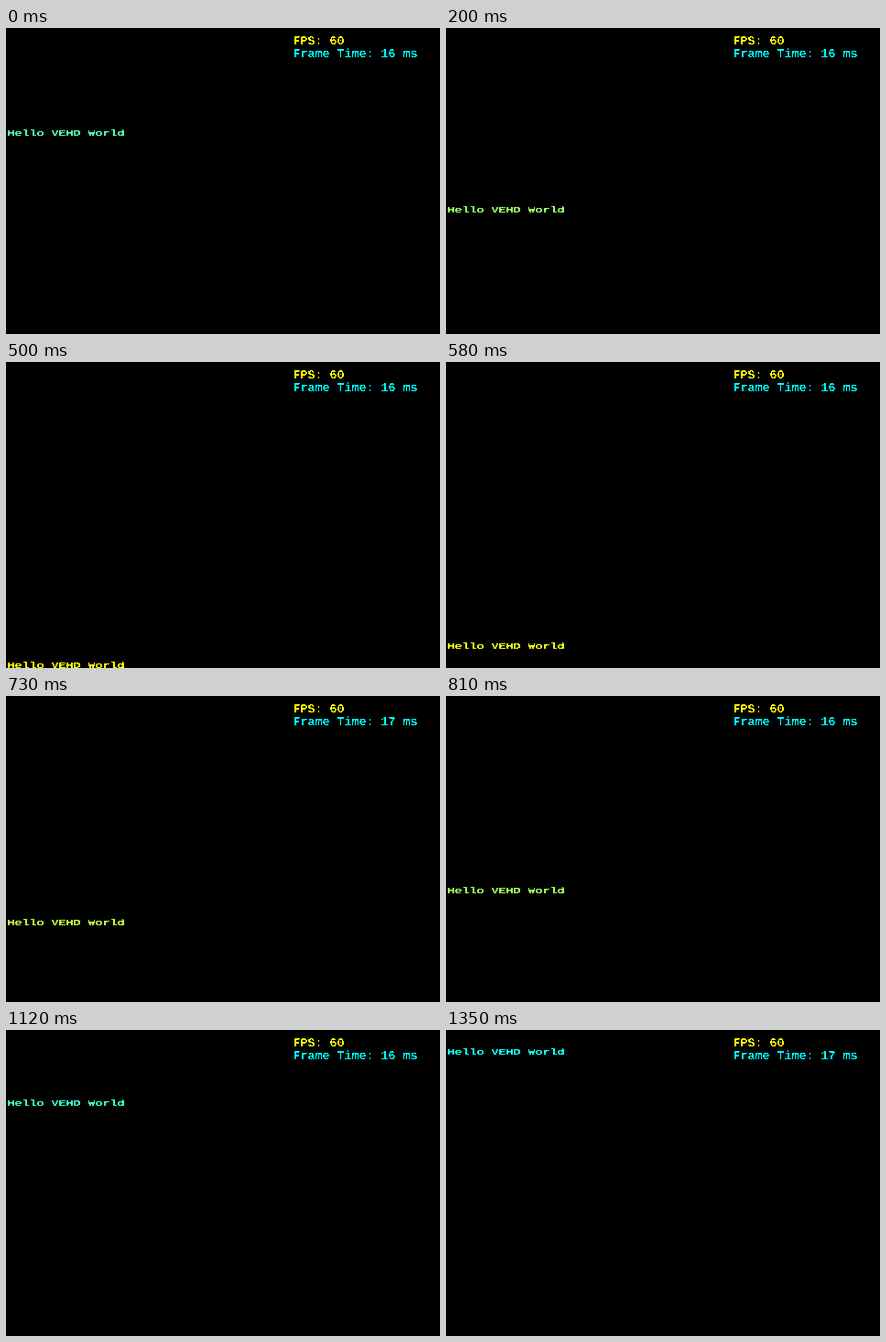
An HTML page that plays this animation: 474x335 px, repeating every 1.43 s.

```html
<!DOCTYPE html>
<html lang="en">
<head>
<meta charset="utf-8">
<title>Bouncing terminal text</title>
<style>
  html, body { margin: 0; height: 100%; overflow: hidden; background: #000; }
  svg { display: block; }
  text {
    font: bold 13.333px "Liberation Mono", "DejaVu Sans Mono", monospace;
    text-rendering: geometricPrecision;
    white-space: pre;
  }
</style>
</head>
<body>
<svg width="474" height="335" viewBox="0 0 474 335">
  <!-- Hard alpha threshold gives the text bitmap-like edges -->
  <filter id="crisp" filterUnits="userSpaceOnUse" x="0" y="0" width="474" height="335"
          color-interpolation-filters="sRGB">
    <feComponentTransfer><feFuncA type="discrete" tableValues="0 1"/></feComponentTransfer>
  </filter>
  <g filter="url(#crisp)">
    <text x="313.5" y="17.5" fill="#ff0">FPS: 60</text>
    <text id="timing" x="313.5" y="31.5" fill="#0ff">Frame Time: 16 ms</text>
    <text id="hello">Hello VEHD World</text>
  </g>
</svg>
<script>
  const LOOP = 1430, ROWS = 48, ROW_HEIGHT = 7, START_ROW = 16;
  const TICKS_PER_MS = 0.0615;
  const updates = [0, 70, 130, 200, 270, 340, 420, 500, 580, 660, 730,
                   810, 890, 960, 1040, 1120, 1200, 1270, 1350];
  const slowUpdates = [340, 730, 1350];
  const hello = document.getElementById('hello');
  const timing = document.getElementById('timing');

  function bounce(step) {
    const phase = step % (2 * ROWS);
    return Math.min(phase, 2 * ROWS - phase);
  }

  function draw(now) {
    const time = now % LOOP;
    const shown = updates.findLast(start => start <= time);
    const row = bounce(START_ROW + Math.round(shown * TICKS_PER_MS));
    const mix = Math.round(255 * row / ROWS);
    hello.setAttribute('transform', `translate(1.5 ${row * ROW_HEIGHT + 6}) scale(1 .7)`);
    hello.setAttribute('fill', `rgb(${mix}, 255, ${255 - mix})`);
    timing.textContent = `Frame Time: ${slowUpdates.includes(shown) ? 17 : 16} ms`;
  }

  const start = performance.now();
  function tick() {
    draw(performance.now() - start);
    requestAnimationFrame(tick);
  }
  tick();
</script>
</body>
</html>
```
